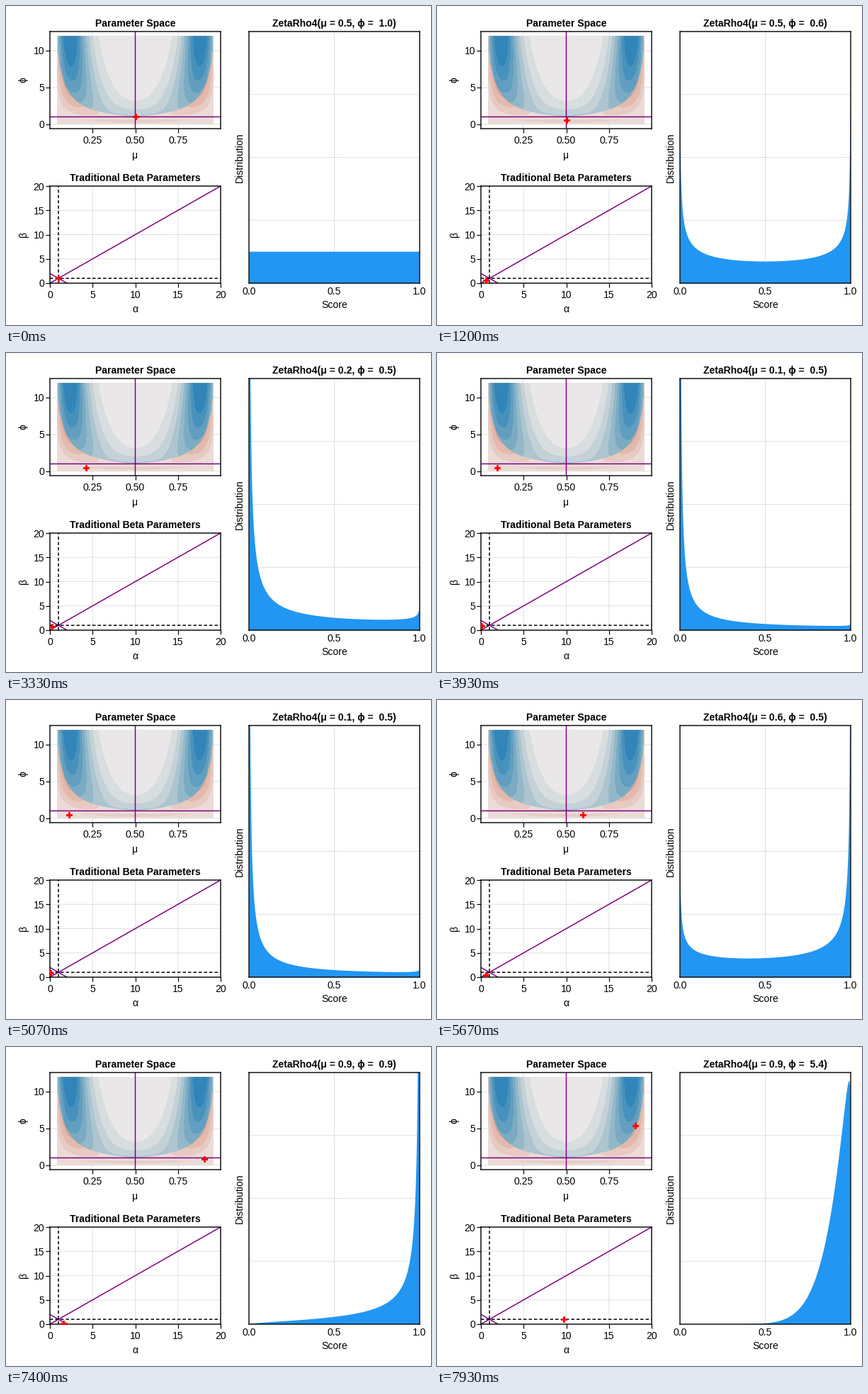
A matplotlib script for the animation above (8000 ms loop, 600 by 450 pixels).

```python
import math

import matplotlib.pyplot as plt
import numpy as np
from matplotlib.animation import FuncAnimation
from matplotlib.patches import Polygon

W, H, DPI = 600, 450, 100
PX = 72 / DPI
STEP_MS, FRAMES, FPS = 40, 200, 15
PURPLE = "#800080"

plt.rcParams["font.family"] = ["Liberation Sans", "DejaVu Sans"]
plt.rcParams["path.snap"] = False
fig = plt.figure(figsize=(W / DPI, H / DPI), dpi=DPI, facecolor="white")
lgamma = np.vectorize(math.lgamma, otypes=[float])


def beta_pdf(x, mu, phi):
    a, b = 2 * mu * phi, 2 * (1 - mu) * phi
    log_norm = lgamma(a + b) - lgamma(a) - lgamma(b)
    return np.exp(log_norm + (a - 1) * np.log(x) + (b - 1) * np.log(1 - x))


def label(x, y, text, **style):
    style = {"ha": "center", "va": "center", "fontsize": 14 * PX, **style}
    return fig.text(x / W, 1 - y / H, text, **style)


def make_axes(left, top, right, bottom, xlim, ylim, xticks, yticks, tick_len):
    ax = fig.add_axes([left / W, 1 - bottom / H, (right - left) / W, (bottom - top) / H])
    ax.set(xlim=xlim, ylim=ylim, xticks=xticks, yticks=yticks)
    ax.set_axisbelow(True)
    ax.grid(color="black", alpha=0.12, linewidth=1 * PX)
    ax.tick_params(length=tick_len * PX, width=1.2 * PX, labelbottom=False, labelleft=False)
    for spine in ax.spines.values():
        spine.set_linewidth(1.4 * PX)
    return ax


def tick_labels(ax, box, xtexts, ytexts, gap):
    left, top, right, bottom = box
    (x0, x1), (y0, y1) = ax.get_xlim(), ax.get_ylim()
    for v, text in zip(ax.get_xticks(), xtexts):
        label(left + (v - x0) / (x1 - x0) * (right - left), bottom + gap, text)
    for v, text in zip(ax.get_yticks(), ytexts):
        y = bottom - (v - y0) / (y1 - y0) * (bottom - top)
        label(left - 8, y, text, ha="right", va="center_baseline")


def cross(ax):
    return ax.scatter([0], [0], marker="P", s=(8.8 * PX) ** 2, color="red", linewidth=0, zorder=5)


# Parameter space
box = (62, 36, 303, 173)
space = make_axes(*box, (0.005, 0.995), (-0.6, 12.6), [0.25, 0.5, 0.75], [0, 5, 10], 6)
tick_labels(space, box, ["0.25", "0.50", "0.75"], ["0", "5", "10"], 16.5)
label(182.5, 25, "Parameter Space", weight="bold")
label(182.5, 210.5, "μ")
label(25, 104, "ϕ", rotation=90)

mus, phis = np.meshgrid(np.linspace(0.05, 0.95, 181), np.linspace(0.02, 12, 181))
tails = beta_pdf(0.105, mus, phis) + beta_pdf(0.895, mus, phis)
reds = ["#ebdbd7", "#e7cac1", "#e3b9ad", "#dea999"]
blues = ["#e9e7e7", "#d8dddf", "#c4d2d7", "#acc5cf", "#93b8c8",
         "#7aabc3", "#619ebf", "#4792bc", "#3285b9"]
space.contourf(mus, phis, tails, levels=[-1, 2.19, 2.86, 3.53, 99], colors=reds, zorder=1.5)
lens = np.linspace(-1, 1, 60)
space.fill(0.5 + 0.32 * lens, 0.6 - 0.4 * (1 - lens ** 2), color="#e5cdc7", linewidth=0, zorder=1.6)
bells = space.contourf(mus, phis, tails,
                       levels=[-1, *(0.49 + 0.67 * np.arange(8)), 99], colors=blues, zorder=1.7)
edge = np.linspace(0.05, 0.95, 181)
rim = np.column_stack([edge, 0.5 / np.minimum(edge, 1 - edge)])
bells.set_clip_path(Polygon([(0.05, 12), *rim, (0.95, 12)], transform=space.transData))
space.axvline(0.5, color=PURPLE, linewidth=1.5 * PX)
space.axhline(1, color=PURPLE, linewidth=1.5 * PX)
space_cross = cross(space)

# Shape parameters
box = (62, 254, 303, 391)
shape = make_axes(*box, (0, 20), (0, 20), range(0, 21, 5), range(0, 21, 5), 6)
numbers = [str(v) for v in range(0, 21, 5)]
tick_labels(shape, box, numbers, numbers, 16.5)
label(182.5, 243, "Traditional Beta Parameters", weight="bold")
label(182.5, 427.5, "α")
label(25, 322.5, "β", rotation=90)
dashes = {"color": "black", "linewidth": 1.5 * PX, "linestyle": (0, (3, 2))}
shape.plot([0, 20], [0, 20], color=PURPLE, linewidth=1.5 * PX)
shape.plot([0, 2], [2, 0], color=PURPLE, linewidth=1.5 * PX)
shape.axvline(1, **dashes)
shape.axhline(1, **dashes)
shape_cross = cross(shape)

# Distribution
box = (343, 36, 584, 391)
dist = make_axes(*box, (0, 1), (0, 8), [0, 0.5, 1], [0, 2, 4, 6, 8], 0)
tick_labels(dist, box, ["0.0", "0.5", "1.0"], [], 12)
title = label(463.5, 25, "", weight="bold")
label(463.5, 422.5, "Score")
label(330, 213.5, "Distribution", rotation=90)
score = np.linspace(0, 1, 500)[1:-1]
band = Polygon([(0, 0), (1, 0)], facecolor="#2196f3", linewidth=0, zorder=2)
dist.add_patch(band)


def ease(p, power):
    p = min(max(p, 0), 1)
    if p < 0.5:
        return 2 ** (power - 1) * p ** power
    return 1 - 2 ** (power - 1) * (1 - p) ** power


def pose(tick):
    """Mean and precision; each 36-tick leg moves for 24 ticks, then rests."""
    def leg(n, power):
        return ease((tick + 0.08 - 36 * n) / 24, power)

    mu = 0.5 - 0.4 * leg(1, 3) + 0.8 * leg(2, 3)
    phi = 1 - 0.5 * leg(0, 2) + 11.5 * leg(3, 2)
    return mu, phi


def update(i):
    tick = int((i * STEP_MS + 30) * FPS / 1000)
    mu, phi = pose(min(tick, 119))
    space_cross.set_offsets([(mu, phi)])
    shape_cross.set_offsets([(2 * mu * phi, 2 * (1 - mu) * phi)])
    curve = np.column_stack([score, beta_pdf(score, mu, phi)])
    band.set_xy([(score[0], 0), *curve, (score[-1], 0)])
    title.set_text(f"ZetaRho4(μ = {mu:.1f}, ϕ = {phi:4.1f})")
    return space_cross, shape_cross, band, title


anim = FuncAnimation(fig, update, frames=FRAMES, interval=STEP_MS, repeat=True, repeat_delay=0)
plt.show()
```
